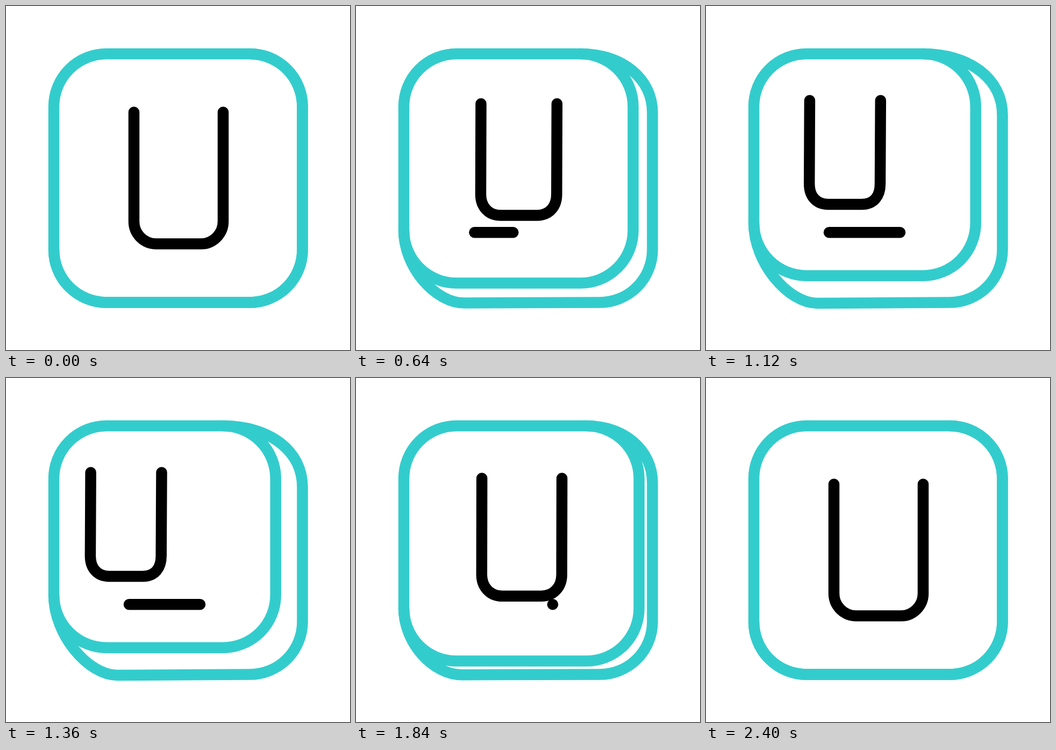
An HTML page for the animation above (2480 ms loop, 640 px wide and 640 px high).

```html
<!DOCTYPE html>
<html lang="en">
<head>
<meta charset="utf-8">
<title>Underline key</title>
<style>
  html, body { margin: 0; width: 100%; height: 100%; overflow: hidden; background: #fff; }
  svg { display: block; width: 100%; height: 100%; }
  path { fill: none; stroke: #000; stroke-width: 20.5; stroke-linecap: round; stroke-linejoin: round; }
  .key { stroke: #33cccc; }
</style>
</head>
<body>
<svg viewBox="0 0 640 640">
  <path id="side" class="key"/>
  <path id="face" class="key"/>
  <path id="letter"/>
  <path id="line"/>
</svg>
<script>
const LOOP = 2480, STEP = 40;
const $ = id => document.getElementById(id);
const mix = (a, b, k) => a + (b - a) * k;

// Progress from a to b along cubic-bezier(x1, 0, x2, 1)
function ease(t, a, b, x1 = 1 / 3, x2 = 2 / 3) {
  const x = Math.min(1, Math.max(0, (t - a) / (b - a)));
  let lo = 0, hi = 1;
  for (let i = 0; i < 24; i++) {
    const s = (lo + hi) / 2, r = 1 - s;
    if (3 * r * r * s * x1 + 3 * r * s * s * x2 + s * s * s < x) lo = s; else hi = s;
  }
  return lo * lo * (3 - 2 * lo);
}

function facePath(p) {
  const r = 98, a = 89, b = 551.5 - 49.8 * p, n = a + r, f = b - r;
  return `M${n} ${a}H${f}A${r} ${r} 0 0 1 ${b} ${n}V${f}A${r} ${r} 0 0 1 ${f} ${b}` +
    `H${n}A${r} ${r} 0 0 1 ${a} ${f}V${n}A${r} ${r} 0 0 1 ${n} ${a}Z`;
}

// Lower right rim, tied to the face at its top right and bottom left corners
function sidePath(p) {
  const e = 551.5, s = 453.5 - 49.8 * p, y = 187 + 16 * p, x = 187 + 20 * p, low = e + 1.5 * p;
  return `M${s} 89C${s + 54 + 32 * p} 89 ${e} ${y - 54 - 14 * p} ${e} ${y}V453.5` +
    `A98 98 0 0 1 453.5 ${e}L${x} ${low}C${x - 54} ${low} 89 ${s + 54 + 20 * p} 89 ${s}`;
}

function letterPath(p, dx) {
  const top = mix(197.5, 175.7, p), stem = mix(401, 331, p), low = mix(442.5, 369, p), h = 22.6;
  const l = mix(238, 229.7, p) + dx, r = mix(404, 361.5, p) + dx;
  const bl = mix(279, 265, p) + dx, br = mix(363, 327, p) + dx;
  return `M${l + 0.7 * p} ${top}L${l} ${stem}C${l} ${stem + h} ${bl - h} ${low} ${bl} ${low}` +
    `H${br}C${br + h} ${low} ${r} ${stem + h} ${r} ${stem}L${r + 0.8 * p} ${top}`;
}

function draw(t) {
  const back = ease(t, 1480, 2200, 0.75, 0.25);
  const p = ease(t, 105, 925) - back;
  const slide = -75 * (ease(t, 920, 1320) - ease(t, 1320, 1710));
  $("face").setAttribute("d", facePath(p));
  $("side").setAttribute("d", sidePath(p));
  $("letter").setAttribute("d", letterPath(p, slide));

  const start = mix(219, 229, ease(t, 520, 1020)) + 10 * back;
  const from = start + 132 * ease(t, 1380, 1860, 0.4, 0.2);
  const to = start + 132 * ease(t, 500, 880, 0.4, 0.2);
  $("line").setAttribute("d", t > 500 && t < 1860 ? `M${from} 421.2H${to + 0.01}` : "");
}

const begin = performance.now();
function tick() {
  const t = (performance.now() - begin) % LOOP;
  draw(Math.floor(t / STEP) * STEP);
  requestAnimationFrame(tick);
}
tick();
</script>
</body>
</html>
```
